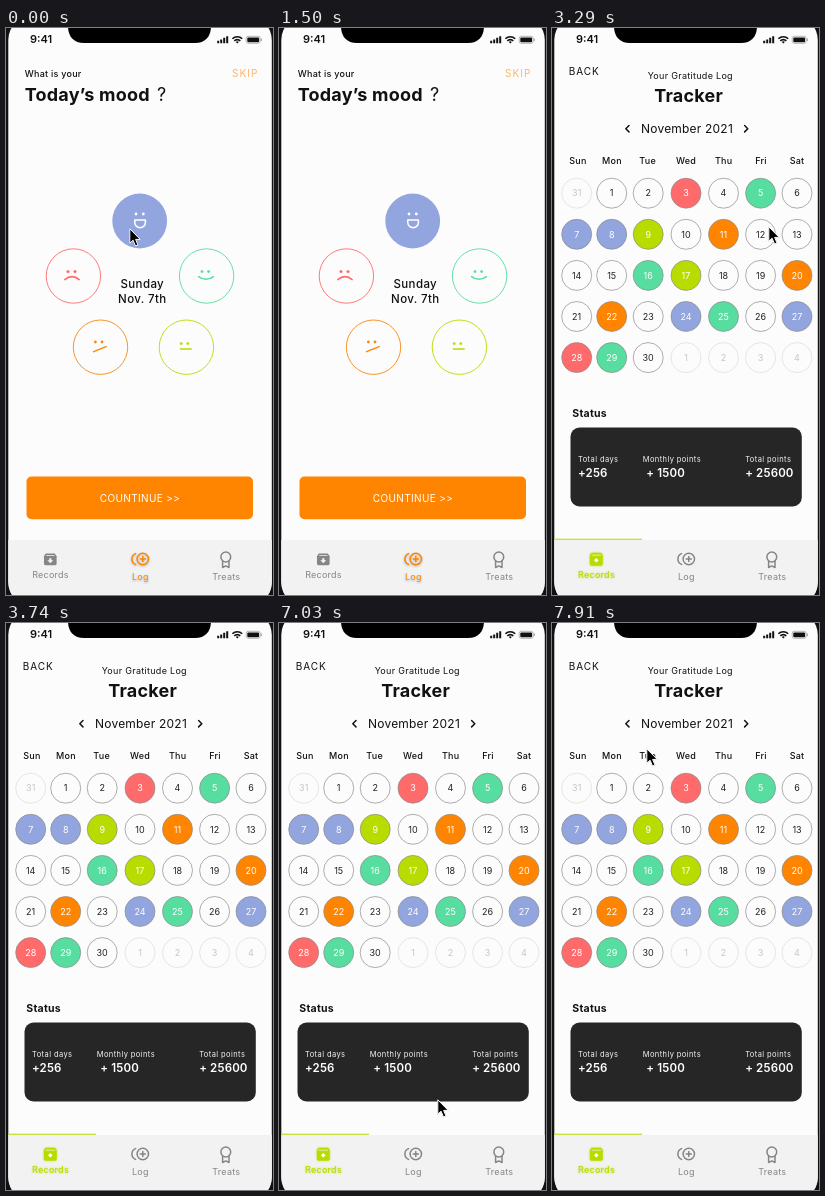
An HTML page for the animation above (8 s loop, 267 px wide and 567 px high).

```html
<!DOCTYPE html>
<html lang="en">
<head>
<meta charset="utf-8">
<title>Mood tracker</title>
<style>
  html, body { margin: 0; width: 100%; height: 100%; overflow: hidden; background: #111; }
  svg { display: block; width: 100vw; height: 100vh; }
  text { font-family: Inter, "Open Sans", sans-serif; font-size: 9px; letter-spacing: .25px; fill: #111; }
  .mid { text-anchor: middle; }
  .medium { font-weight: 500; }
  .title { font-size: 18px; font-weight: 700; letter-spacing: .22px; }
  .date { font-size: 11.5px; letter-spacing: .38px; }
  .stat { font-size: 7.5px; letter-spacing: .42px; fill: #f4f4f4; }
  .value { font-size: 11.5px; font-weight: 600; letter-spacing: .15px; fill: #fff; }
  .line { fill: none; stroke: currentColor; stroke-linecap: round; stroke-linejoin: round; stroke-width: 1.5; }
  .ring { fill: none; stroke: currentColor; stroke-width: .9; }
  .dot { fill: currentColor; }
  .tab { color: #858585; }
  .label { fill: currentColor; text-anchor: middle; }
  .red { color: #ff6b6b; } .green { color: #56dd9f; } .blue { color: #92a5de; }
  .orange { color: #ff8500; } .lime { color: #b9dc00; }
  .lit { filter: drop-shadow(0 1px 1.2px rgba(0, 0, 0, .28)); }
  .glow { filter: drop-shadow(0 0 1.2px rgba(185, 220, 0, .7)); }
  .arrow { filter: drop-shadow(0 .8px .7px rgba(0, 0, 0, .3)); }

  .mood, .tracker, .arrow, .hand { animation: 8s step-end infinite; }
  .mood { animation-name: mood; }
  .tracker { animation-name: tracker; }
  .hand { animation-name: hand; }
  .arrow { animation-name: arrow; }
  @keyframes mood { 0% { visibility: visible } 35.625%, 100% { visibility: hidden } }
  @keyframes tracker { 0% { visibility: hidden } 35.625%, 100% { visibility: visible } }
  @keyframes hand {
    0% { visibility: hidden } 9.375% { visibility: visible } 18.75%, 100% { visibility: hidden }
  }
  @keyframes arrow {
    0% { transform: translate(123px, 200px) }
    3.75% { transform: translate(143px, 294px) }
    5.625% { transform: translate(154px, 371px) }
    7.5% { transform: translate(154.5px, 429px) }
    9.375% { transform: translate(-40px, -40px) }
    35.625% { transform: translate(142px, 147px) }
    37.5% { transform: translate(142.5px, 147.3px) }
    39.25% { transform: translate(171px, 157px) }
    41.125% { transform: translate(216px, 198px) }
    43% { transform: translate(188px, 399px) }
    44.875% { transform: translate(188px, 407px) }
    46.75% { transform: translate(-40px, -40px) }
    78.625% { transform: translate(190px, 452px) }
    80.375% { transform: translate(211px, 342px) }
    82.25% { transform: translate(241px, 362px) }
    84.125% { transform: translate(241.5px, 346px) }
    87.875% { transform: translate(158px, 476px) }
    89.625% { transform: translate(-40px, -40px) }
    91.5% { transform: translate(180px, 393.5px) }
    93.25% { transform: translate(148px, 482px) }
    95.125% { transform: translate(120px, 155px) }
    97% { transform: translate(157px, 121px) }
    98.875%, 100% { transform: translate(94px, 125px) }
  }
</style>
</head>
<body>
<svg viewBox="0 0 267 567">
  <defs>
    <clipPath id="screen"><rect x="2.3" y="-12" width="263.5" height="590" rx="24"/></clipPath>
    <g id="log">
      <g class="line">
        <circle cx="136.8" cy="531" r="5.7"/>
        <path d="M136.8 528.4v5.2M134.2 531h5.2M129.6 525.6a5.8 5.8 0 0 0 0 10.8"/>
      </g>
      <text class="label" x="134.3" y="552">Log</text>
    </g>
    <g id="treats">
      <g class="line">
        <circle cx="219.8" cy="529" r="4.9"/>
        <path d="M216.6 533.2v6.3l3.2-1.6 3.2 1.6v-6.3"/>
      </g>
      <text class="label" x="220.3" y="552">Treats</text>
    </g>
  </defs>

  <rect width="267" height="567" fill="#111"/>
  <g clip-path="url(#screen)">
    <rect width="267" height="567" fill="#fcfcfc"/>
    <rect y="512" width="267" height="55" fill="#f2f2f2"/>

    <g class="mood">
      <text class="medium" x="18.7" y="49">What is your</text>
      <text class="title" x="18.7" y="73">Today’s mood</text>
      <text x="151" y="73" style="font-size:18px">?</text>
      <text x="226" y="49" style="font-size:10px;letter-spacing:1.1px;fill:#ffb469">SKIP</text>

      <circle class="dot blue" cx="133.7" cy="193" r="27.4"/>
      <g color="#fff">
        <circle class="dot" cx="130" cy="186" r="1.4"/><circle class="dot" cx="137.3" cy="186" r="1.4"/>
        <path class="line" d="M128.8 192h10.6v2.4a5.3 5.3 0 0 1-10.6 0z"/>
      </g>
      <g class="red">
        <circle class="ring" cx="67.4" cy="248" r="27.2"/>
        <circle class="dot" cx="62" cy="243.6" r="1.5"/><circle class="dot" cx="69" cy="243.6" r="1.5"/>
        <path class="line" d="M58.8 251.6q7.2-6 14.4 0"/>
      </g>
      <g class="green">
        <circle class="ring" cx="200.6" cy="248" r="27.2"/>
        <circle class="dot" cx="196" cy="243.6" r="1.4"/><circle class="dot" cx="202.6" cy="243.6" r="1.4"/>
        <path class="line" d="M192.6 248.6q7.4 5.4 14.8 0"/>
      </g>
      <g color="#f68a10">
        <circle class="ring" cx="94.5" cy="319.2" r="27.2"/>
        <circle class="dot" cx="89.4" cy="314" r="1.4"/><circle class="dot" cx="96" cy="314" r="1.4"/>
        <path class="line" d="M87.6 323.6l12.6-5"/>
      </g>
      <g class="lime">
        <circle class="ring" cx="180.4" cy="319.2" r="27.2"/>
        <circle class="dot" cx="175.2" cy="315.6" r="1.4"/><circle class="dot" cx="181.8" cy="315.6" r="1.4"/>
        <path class="line" d="M174.4 321h10.8"/>
      </g>
      <g class="mid medium">
        <text class="date" x="136.3" y="260">Sunday</text>
        <text class="date" x="136.3" y="275">Nov. 7th</text>
      </g>

      <rect x="20.5" y="448.5" width="226.5" height="42.7" rx="5" fill="#ff8500"/>
      <text class="mid" x="134" y="473.7" style="font-size:10px;letter-spacing:.35px;fill:#fff">COUNTINUE &gt;&gt;</text>

      <g class="tab">
        <path class="dot" d="M39.8 525.6h9l1.8 2.6v7.6a1.4 1.4 0 0 1-1.4 1.4h-9.8a1.4 1.4 0 0 1-1.4-1.4v-7.6z"/>
        <path d="M40.2 527.2h8.2v.7h-8.2zM44.3 535.3l-3-3h1.9v-2h2.2v2h1.9z" fill="#f2f2f2"/>
        <text class="label" x="44.5" y="550">Records</text>
        <use href="#treats"/>
      </g>
      <use href="#log" class="orange lit"/>
    </g>

    <g class="tracker">
      <text x="16.7" y="47" style="font-size:10px;letter-spacing:1px">BACK</text>
      <text class="mid" x="138.3" y="51" style="letter-spacing:.3px">Your Gratitude Log</text>
      <text class="mid title" x="136.7" y="73.5">Tracker</text>
      <text class="mid" x="135" y="104.7" style="font-size:12px;letter-spacing:.2px">November 2021</text>
      <path class="line" color="#111" d="M77 97.5l-3.2 3.2 3.2 3.2M192.6 97.5l3.2 3.2-3.2 3.2"/>
      <g id="calendar" class="mid"></g>

      <text x="20.3" y="388.5" style="font-size:10.5px;font-weight:700">Status</text>
      <rect x="18.5" y="399.5" width="231.3" height="79" rx="9" fill="#262626"/>
      <text class="stat" x="26" y="434.3">Total days</text>
      <text class="stat" x="90.7" y="434.3">Monthly points</text>
      <text class="stat" x="193.2" y="434.3">Total points</text>
      <text class="value" x="26" y="449.3">+256</text>
      <text class="value" x="94.3" y="449.3">+ 1500</text>
      <text class="value" x="193.2" y="449.3">+ 25600</text>

      <rect y="510.6" width="90" height="1.4" fill="#c9e043"/>
      <g class="tab"><use href="#log"/><use href="#treats"/></g>
      <g class="lime glow">
        <path class="dot" d="M39.6 524.7h9.4l1.8 2.4v8.9a1.8 1.8 0 0 1-1.8 1.8h-9.4a1.8 1.8 0 0 1-1.8-1.8v-8.9z"/>
        <path d="M39.6 527.2h9.4" stroke="#f2f2f2" stroke-width=".7"/>
        <path d="M44.3 530l2.3 2.3-2.3 2.3-2.3-2.3z" fill="#fff"/>
        <text class="label medium" x="44.5" y="550">Records</text>
      </g>
    </g>

    <path d="M62 -2c0 10 5 17 16 17h111c11 0 16-7 16-17z" fill="#000"/>
    <text class="mid" x="35" y="15.3" style="font-size:11px;font-weight:600;letter-spacing:0">9:41</text>
    <path d="M212.2 12.7v2.5M215.2 11.4v3.8M218.2 9.8v5.4M221.2 8.2v7" stroke="#111" stroke-width="2"/>
    <g fill="none" stroke="#111" stroke-width="1.6">
      <path d="M226.4 10.8a6.9 6.9 0 0 1 9.8 0M228.3 12.9a4.2 4.2 0 0 1 6 0"/>
      <path d="M231.3 15.6l-1.5-1.6a2.1 2.1 0 0 1 3 0z" fill="#111" stroke="none"/>
    </g>
    <rect x="240.2" y="8.3" width="14" height="7" rx="2" fill="none" stroke="#999" stroke-width=".7"/>
    <rect x="241.3" y="9.4" width="11.8" height="4.8" rx="1" fill="#111"/>
    <path d="M255.3 10.5v2.6" stroke="#999"/>
  </g>

  <path class="hand" transform="translate(151 478)" fill="#fff" stroke="#000" stroke-linejoin="round"
    d="M4.5 10.5V2a1.5 1.5 0 0 1 3 0v5a1.4 1.4 0 0 1 2.5.3 1.4 1.4 0 0 1 2.5.5 1.3 1.3 0 0 1 2.5 1v4l-1.5 4.5h-7L1 11.7a1.4 1.4 0 0 1 2-1.8z"/>
  <path class="arrow" fill="#000" stroke="#fff" d="M.8 .8V15.2L4.1 12.2 6.5 18 9 17 6.6 11.4H11.2Z"/>
</svg>
<script>
  const NS = 'http://www.w3.org/2000/svg';
  const calendar = document.getElementById('calendar');
  const columns = [24.7, 59.7, 96.2, 134, 171.5, 208.6, 245];
  const headX = [26, 60, 95.7, 134, 171.7, 209, 245];
  const moods = {
    red: [3, 28], green: [5, 16, 25, 29], blue: [7, 8, 24, 27],
    lime: [9, 17], orange: [11, 20, 22]
  };

  function add(tag, attrs, label) {
    const el = document.createElementNS(NS, tag);
    for (const key in attrs) el.setAttribute(key, attrs[key]);
    if (label !== undefined) el.textContent = label;
    calendar.append(el);
  }

  ['Sun', 'Mon', 'Tue', 'Wed', 'Thu', 'Fri', 'Sat'].forEach((name, i) =>
    add('text', { x: headX[i], y: 136, class: 'medium' }, name));

  for (let i = 0; i < 35; i++) {
    const x = columns[i % 7];
    const y = 165.2 + 41.1 * Math.floor(i / 7);
    const outside = i < 1 || i > 30;
    const day = i < 1 ? 31 : outside ? i - 30 : i;
    const mood = !outside && Object.keys(moods).find(m => moods[m].includes(day));
    add('circle', {
      cx: x, cy: y, r: 15, class: mood || '', fill: mood ? 'currentColor' : 'none',
      stroke: outside ? '#dcdcdc' : '#8c8c8c', 'stroke-width': .7
    });
    const ink = outside ? '#c6c6c6' : mood ? '#fff' : '#222';
    add('text', { x, y: y + 3.2, style: `fill:${ink};letter-spacing:0` }, day);
  }
</script>
</body>
</html>
```
